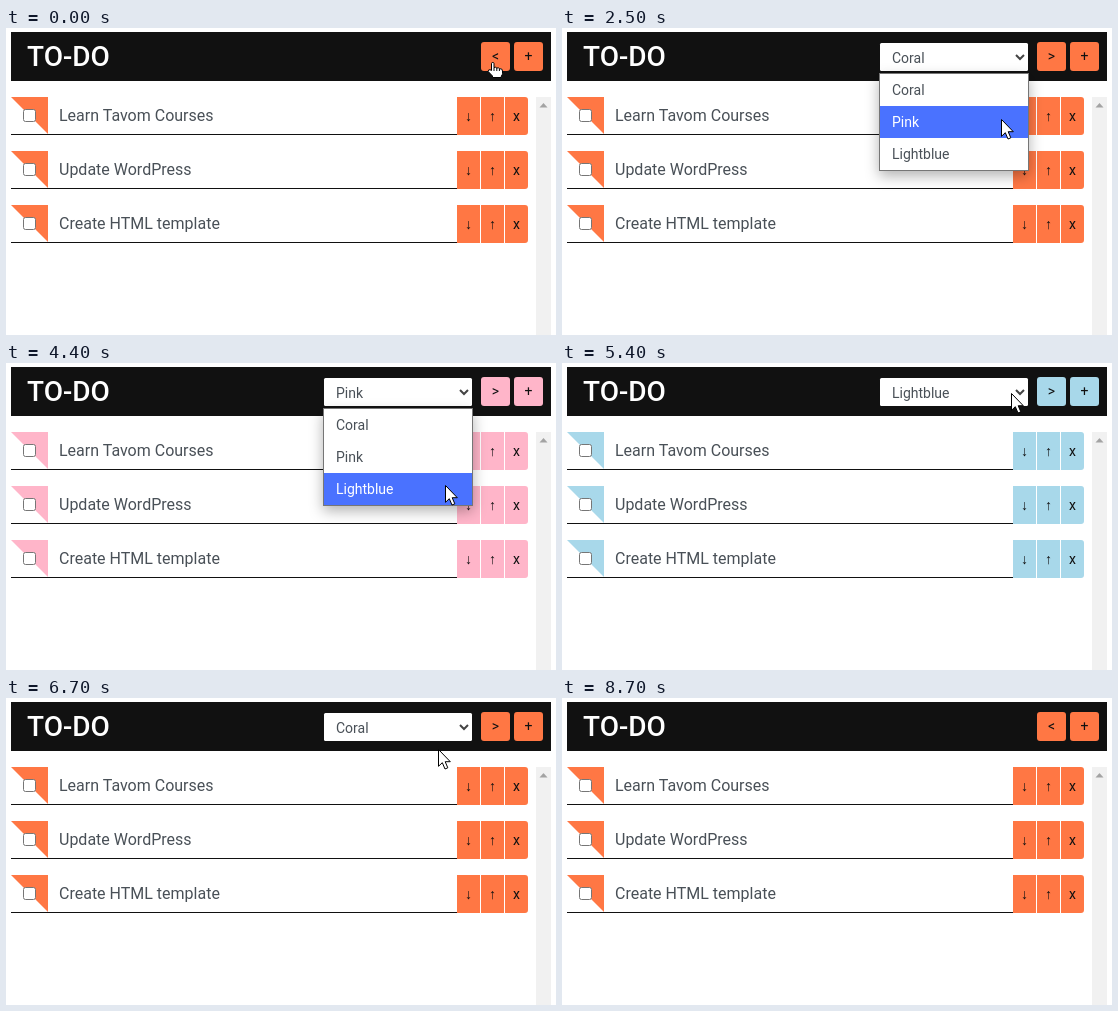
These frames come from a looping animation (550x307 px, 9900 ms). An HTML page:

```html
<!DOCTYPE html>
<html lang="en">
<head>
<meta charset="utf-8">
<title>To-do list themes</title>
<style>
  html, body { margin: 0; width: 100%; height: 100%; overflow: hidden; background: #fff; }
  svg { display: block; width: 550px; height: 307px; }
  text { font-family: Roboto, "Liberation Sans", Arial, sans-serif; fill: #111; font-size: 14px; }
  .key { text-anchor: middle; }
  .item { font-size: 16px; fill: #495057; }
  .option { fill: #495057; }
  .theme { fill: var(--theme); }
</style>
</head>
<body>
<svg id="stage" viewBox="0 0 550 307">
  <defs>
    <filter id="shadow" x="-30%" y="-30%" width="160%" height="170%">
      <feDropShadow dx="0" dy="5" stdDeviation="7" flood-opacity=".3"/>
    </filter>
  </defs>
  <rect x="5" y="4" width="540" height="49" fill="#111"/>
  <text x="21" y="38" style="font-size:28px;font-weight:500;fill:#fff">TO-DO</text>
  <rect x="530" y="69" width="15" height="238" fill="#f1f1f1"/>
  <path d="M533.5 79.5 L537.5 75 L541.5 79.5Z" fill="#a3a3a3"/>
  <g id="rows"></g>
  <rect class="theme" x="475" y="14" width="29" height="29" rx="3"/>
  <rect class="theme" x="508" y="14" width="29" height="29" rx="3"/>
  <text id="toggle" class="key" x="489.5" y="33"></text>
  <text class="key" x="522.5" y="33">+</text>
  <g id="select">
    <rect x="318" y="15" width="148" height="28" rx="1.5" fill="#fff"/>
    <text id="value" class="option" x="330" y="35"></text>
    <path d="M454 27 L458 31 L462 27" fill="none" stroke="#444" stroke-width="2"/>
  </g>
  <g id="popup">
    <rect x="317.5" y="45.5" width="149" height="97" fill="#fff" stroke="#767676" filter="url(#shadow)"/>
    <rect id="highlight" x="318" width="148" height="32" fill="#4a72ff"/>
    <g id="options"></g>
  </g>
  <g id="cursor" fill="#fff" stroke="#000" stroke-linejoin="round">
    <path id="arrow" d="M.5 .5V17.3L4.3 13.7L7 20L9.8 18.8L7.2 12.7H12.3Z"/>
    <path id="hand" d="M-1.5 8.5V1.5Q-1.5 .5 -.2 .5Q1 .5 1 1.5V5.5Q3 4.7 3.8 6Q5.6 5.3 6.4 6.7Q9.5 6.2 9.5 9V11.5Q9.5 13 8.3 14V15.5H-.5V14L-4.8 9.5Q-5 7.5 -3 7.7ZM1 5.5V9M3.8 6V9M6.4 6.7V9"/>
  </g>
</svg>
<script>
const LOOP = 9900, STEP = 100;
const $ = id => document.getElementById(id);
const clamp = v => Math.max(0, Math.min(1, v));

const names = ['Coral', 'Pink', 'Lightblue'];
const colors = [[255, 119, 68], [255, 181, 201], [168, 216, 234]];
const tasks = ['Learn Tavom Courses', 'Update WordPress', 'Create HTML template'];

// Pointer moves: start time, end time, destination
const moves = [
  [200, 300, 496, 34], [1200, 1600, 456, 31], [2000, 2500, 439, 91],
  [2900, 3200, 450, 41], [3300, 3400, 450, 39], [3900, 4300, 440, 127],
  [4300, 4400, 439, 122], [4700, 5400, 449, 30], [5800, 6300, 432, 51],
  [6800, 7200, 502, 22], [7300, 7500, 489, 29], [8500, 8600, 300, -6]
];
// Each pick: popup opens, option chosen, option index
const picks = [[1700, 2900, 1], [3600, 4700, 2], [5600, 6600, 0]];

$('rows').innerHTML = tasks.map((task, i) => `
  <g transform="translate(0 ${69 + 54 * i})">
    <path class="theme" d="M5 0H42V37Z"/>
    <rect x="5" y="37" width="446" height="1" fill="#111"/>
    <rect x="17.5" y="12.5" width="12" height="12" rx="2" fill="#fff" stroke="#767676"/>
    <text class="item" x="53" y="24">${task}</text>
    <path class="theme" d="M451 0h23v38h-23zM475 0h23v38h-23zM499 0h20q3 0 3 3v32q0 3 -3 3h-20z"/>
    <text class="key" x="462.5" y="24">↓</text>
    <text class="key" x="486.5" y="24">↑</text>
    <text class="key" x="510.5" y="24">x</text>
  </g>`).join('');

$('options').innerHTML = names.map((name, i) =>
  `<text class="option" x="330" y="${67 + 32 * i}">${name}</text>`).join('');
const optionTexts = [...$('options').children];

function pointerAt(t) {
  let x = 487, y = 34;
  for (const [start, end, toX, toY] of moves) {
    const p = clamp((t - start) / (end - start));
    const ease = p * p * (3 - 2 * p);
    x += (toX - x) * ease;
    y += (toY - y) * ease;
  }
  return [x, y];
}

function themeAt(t) {
  let value = 0, color = colors[0], popup = 0;
  for (const [open, chosen, index] of picks) {
    if (t >= open && t < chosen) popup = t < open + STEP ? .5 : 1;
    if (t >= chosen) {
      const from = colors[value];
      const mix = t < chosen + STEP ? .5 : 1;
      color = colors[index].map((c, i) => Math.round(from[i] + (c - from[i]) * mix));
      value = index;
    }
  }
  return { value, color, popup };
}

function render(time) {
  const t = Math.floor(time % LOOP / STEP) * STEP;
  const [x, y] = pointerAt(t);
  const { value, color, popup } = themeAt(t);

  $('stage').style.setProperty('--theme', `rgb(${color})`);
  $('toggle').textContent = t >= 800 && t < 7700 ? '>' : '<';
  $('select').setAttribute('opacity', clamp((t - 700) / 400) - clamp((t - 7600) / 400));
  $('value').textContent = names[value];

  const hover = y >= 46 ? Math.min(2, Math.floor((y - 46) / 32)) : value;
  $('popup').setAttribute('opacity', popup);
  $('highlight').setAttribute('y', 46 + 32 * hover);
  optionTexts.forEach((text, i) => { text.style.fill = i === hover ? '#fff' : ''; });

  const onButton = x >= 475 && y >= 14;
  $('cursor').setAttribute('transform', `translate(${Math.round(x)} ${Math.round(y)})`);
  $('cursor').setAttribute('visibility', t < 8700 ? 'visible' : 'hidden');
  $('hand').setAttribute('display', onButton ? 'inline' : 'none');
  $('arrow').setAttribute('display', onButton ? 'none' : 'inline');
}

const begin = performance.now();
function tick() {
  render(performance.now() - begin);
  requestAnimationFrame(tick);
}
tick();
</script>
</body>
</html>
```
